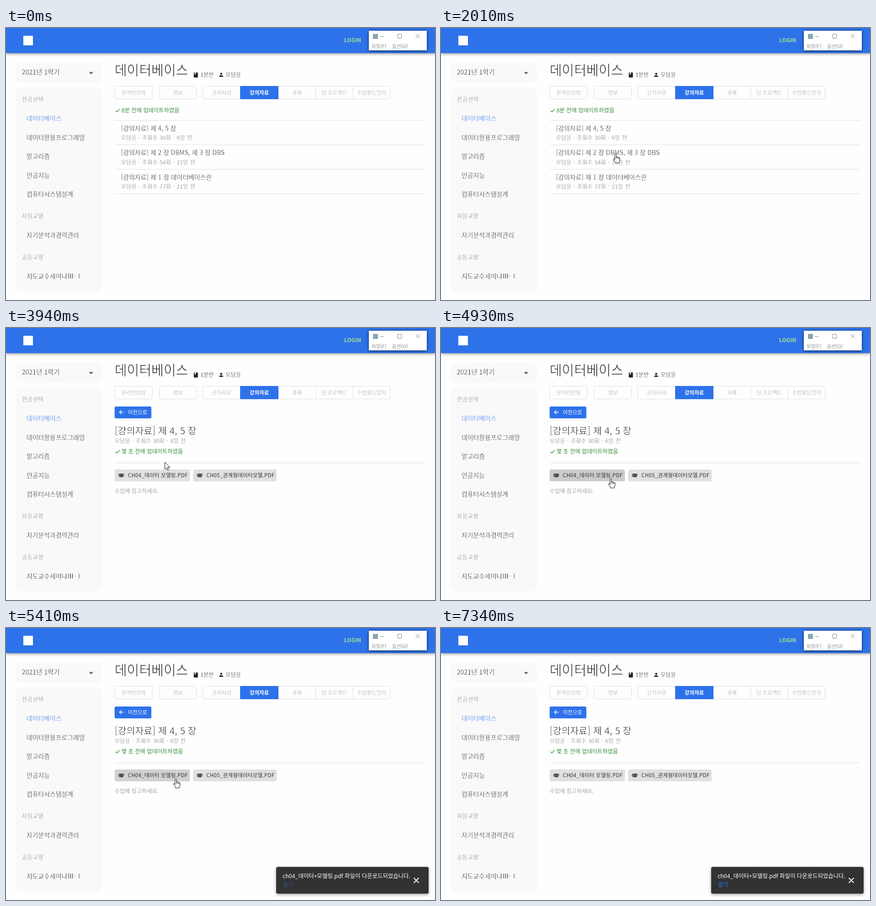
These frames come from a looping animation (940 px wide and 596 px high, 8000 ms). An HTML page:

```html
<!DOCTYPE html>
<html lang="ko">
<head>
<meta charset="utf-8">
<title>강의자료</title>
<style>
html, body { margin: 0; width: 100%; height: 100%; overflow: hidden; background: #fefefe; }
svg { display: block; width: 940px; height: 596px; }
/* the pale outline thins the glyphs where no light weight is installed */
text { font: 300 12.2px "Noto Sans CJK KR", "Noto Sans CJK", sans-serif; fill: #2a2a2a; stroke: #fdfdfd; stroke-width: .025em; white-space: pre; }
.item { font-size: 13.9px; }
.section { font-size: 12px; letter-spacing: .9px; fill: #777; }
.title { font-size: 13.9px; }
.meta { fill: #777; word-spacing: 1.2px; }
.tab { font-size: 11.5px; fill: #999; text-anchor: middle; }
.chip { font-size: 11.5px; letter-spacing: .3px; fill: #333; }
.menu { font-size: 10.6px; fill: #555; }
.toast { font-size: 12.4px; font-weight: 500; fill: #fff; }
.on { fill: #fff; font-weight: 700; }
.blue { fill: #2e72ea; }
.green { font-size: 12.3px; fill: #388e3c; font-weight: 400; }
.chip, .toast, .on, .green, .solid { stroke: none; }
.line { fill: none; stroke: #dedede; }
.shade { filter: drop-shadow(0 2px 3px #0006); }
.float { filter: drop-shadow(0 1px 3px #000a); }
</style>
</head>
<body>
<svg viewBox="0 0 940 596">
  <defs>
    <path id="check" d="M240 0l3 3 6-6.5" fill="none" stroke="#388e3c" stroke-width="1.3"/>
    <path id="close" d="M-5.5-5.5l11 11m0-11l-11 11" stroke="#fff" stroke-width="1.9"/>
    <path id="clip" d="M11 3H4a3 3 0 0 1 0-6h6a2 2 0 0 1 0 4H4.5a1 1 0 0 1 0-2H10" fill="none" stroke="#222" stroke-width="1.3"/>
  </defs>

  <!-- header -->
  <rect class="shade" width="940" height="55" fill="#2e72ea"/>
  <rect x="38" y="17" width="21" height="21" fill="#fff"/>
  <text class="solid" x="741" y="31" style="font-size:12px;font-weight:700;fill:#a0e38c">LOGIN</text>
  <rect class="float" x="795" y="6" width="127" height="43" fill="#fff"/>
  <rect x="804" y="13" width="11" height="11" fill="#8aa5b5"/>
  <path d="M819 18.500h9M858.500 13.500h8v9h-8zM897.500 13.500l9 9m0-9l-9 9" fill="none" stroke="#888"/>
  <text class="menu" x="801" y="44">파일(F)</text>
  <text class="menu" x="846" y="44">옵션(O)</text>

  <!-- sidebar -->
  <rect x="21" y="76" width="190" height="44" rx="14" fill="#f9f9f9"/>
  <rect x="21" y="130" width="190" height="447" rx="14" fill="#f9f9f9"/>
  <text x="34.5" y="102" style="font-size:14.3px">2021년 1학기</text>
  <path d="M181.500 96.500h10l-5 5z" fill="#666"/>
  <text class="section" x="35" y="161">전공선택</text>
  <text class="item blue" x="45" y="203">데이터베이스</text>
  <text class="item" x="45" y="244.500">데이터활용프로그래밍</text>
  <text class="item" x="45" y="286">알고리즘</text>
  <text class="item" x="45" y="328">인공지능</text>
  <text class="item" x="45" y="369">컴퓨터시스템설계</text>
  <text class="section" x="35" y="416.500">자율교양</text>
  <text class="item" x="45" y="459">자기분석과경력관리</text>
  <text class="section" x="35" y="506.500">공통교양</text>
  <text class="item" x="45" y="549">지도교수세미나Ⅲ-Ⅰ</text>

  <!-- course heading -->
  <text x="238" y="103" style="font-size:29.2px">데이터베이스</text>
  <rect x="411.500" y="97.500" width="9" height="11" rx="1" fill="#222"/>
  <path d="M413.500 98v4l1.300-1 1.300 1v-4z" fill="#fff"/>
  <text x="426" y="106.500">1분반</text>
  <circle cx="471.500" cy="100.500" r="2.300" fill="#222"/>
  <path d="M467 107v-1c0-3 9-3 9 0v1z" fill="#222"/>
  <text x="481" y="106.500">오담율</text>

  <!-- tabs -->
  <path class="line" d="M678.500 128v27M760.500 128v27"/>
  <rect class="line" x="238.500" y="127.500" width="82" height="28" rx="3"/>
  <rect class="line" x="335.500" y="127.500" width="82" height="28" rx="3"/>
  <rect class="line" x="431.500" y="127.500" width="410" height="28" rx="3"/>
  <rect x="513" y="127" width="84" height="29" fill="#2e72ea"/>
  <text class="tab" x="279.500" y="145.500">온라인강의</text>
  <text class="tab" x="376.500" y="145.500">정보</text>
  <text class="tab" x="472.500" y="145.500">공지사항</text>
  <text class="tab on" x="555" y="145.500">강의자료</text>
  <text class="tab" x="637" y="145.500">과제</text>
  <text class="tab" x="719" y="145.500">팀 프로젝트</text>
  <text class="tab" x="801" y="145.500">수업활동일지</text>

  <!-- list of posts -->
  <g id="list">
    <use href="#check" y="181"/>
    <text id="updated" class="green" x="253" y="184.500"></text>
    <path class="line" d="M238 202.500h681M238 256h681M238 309.500h681M238 363h681"/>
    <text class="title" x="252" y="224.500">[강의자료] 제 4, 5 장</text>
    <text class="meta" x="252" y="245">오담율 · 조회수 30회 · 6일 전</text>
    <text class="title" x="252" y="278">[강의자료] 제 2 장 DBMS, 제 3 장 DBS</text>
    <text class="meta" x="252" y="298.500">오담율 · 조회수 54회 · 15일 전</text>
    <text class="title" x="252" y="331.500">[강의자료] 제 1 장 데이터베이스란</text>
    <text class="meta" x="252" y="352">오담율 · 조회수 77회 · 21일 전</text>
  </g>

  <!-- opened post -->
  <g id="post">
    <rect x="238" y="172" width="80.500" height="26" rx="3" fill="#2e72ea"/>
    <path d="M258 184.500h-9.500m4.500-4.500l-4.500 4.500 4.500 4.500" fill="none" stroke="#fff" stroke-width="1.300"/>
    <text class="solid" x="267" y="188.500" style="font-size:11.5px;font-weight:500;fill:#fff">이전으로</text>
    <text x="238" y="232.500" style="font-size:20.6px">[강의자료] 제 4, 5 장</text>
    <text class="meta" x="238" y="252">오담율 · 조회수 30회 · 6일 전</text>
    <use href="#check" y="271"/>
    <text class="green" x="253" y="274.500">몇 초 전에 업데이트하였음</text>
    <path class="line" d="M238 295.500h681"/>
    <rect id="chip" x="238" y="310" width="165" height="26" rx="3.500"/>
    <rect x="410" y="310" width="183" height="26" rx="3.500" fill="#e0e0e0"/>
    <use href="#clip" x="246" y="323"/>
    <use href="#clip" x="418" y="323"/>
    <text class="chip" x="267" y="327">CH04_데이터 모델링.PDF</text>
    <text class="chip" x="439" y="327">CH05_관계형데이터모델.PDF</text>
    <text x="238" y="362" style="fill:#777">수업에 참고하세요.</text>
  </g>

  <!-- notifications -->
  <g id="loading">
    <rect class="shade" x="591.500" y="490.500" width="334.500" height="91.500" rx="3.500" fill="#323232"/>
    <text class="toast" x="605" y="520">ch04_데이터+모델링.pdf 파일을 다운로드 중입니다 ...</text>
    <use href="#close" x="899" y="516"/>
    <text class="toast" x="912" y="554.500" text-anchor="end">0Byte / 964.11KB</text>
    <rect x="605" y="567" width="307" height="3.500" fill="#b9c6ee"/>
  </g>
  <g id="done">
    <rect class="shade" x="592" y="523.500" width="334" height="58.500" rx="3.500" fill="#323232"/>
    <text class="toast" x="606" y="548">ch04_데이터+모델링.pdf 파일이 다운로드되었습니다.</text>
    <text id="open" class="blue solid" x="606.500" y="566.500">열기</text>
    <use href="#close" x="899" y="553"/>
  </g>

  <g id="cursor" fill="#fff" stroke="#111" stroke-linejoin="round">
    <path id="arrow" d="M0 0V15.600L3.600 12.200 6 17.800 8.400 16.800 6 11.300H11z"/>
    <path id="hand" d="M-1.600 13.500V1.800a1.600 1.600 0 0 1 3.200 0V8a1.400 1.400 0 0 1 2.800 .400a1.400 1.400 0 0 1 2.600 .600a1.400 1.400 0 0 1 2.400 1V14q0 2.500-1.500 4.500v2H-.500V19L-4.800 12.600q-.400-1.800 1.200-1.900q1 0 2 1.600zM1.600 8v3M4.400 8.400v3M7 9v3"/>
  </g>
</svg>
<script>
const LOOP = 8000;
const $ = id => document.getElementById(id);
const show = (id, on) => $(id).style.display = on ? '' : 'none';
const within = (t, a, b) => t >= a && t < b;
const clamp = v => Math.max(0, Math.min(1, v));

// pointer path: time, x, y
const path = [
  [70, 873, 540], [230, 560, 365], [390, 340, 215], [540, 283, 181],
  [1250, 283, 181], [1540, 283, 204], [1800, 325, 258], [2000, 380, 276],
  [2310, 448, 250], [2560, 476, 222], [2870, 476, 222], [2960, 484, 227],
  [3300, 410, 251], [3630, 338, 218], [3940, 348, 294], [4170, 372, 330],
  [5720, 372, 330], [6100, 500, 435], [6500, 621, 548], [6620, 622, 560],
  [6730, 617, 552], [7100, 616, 551], [7340, -15, 301]
];

function pointAt(t) {
  const i = Math.max(1, path.findIndex(p => p[0] > t));
  const [t0, x0, y0] = path[i - 1], [t1, x1, y1] = path[i];
  const k = clamp((t - t0) / (t1 - t0));
  return [x0 + (x1 - x0) * k, y0 + (y1 - y0) * k];
}

function draw(t) {
  const opened = t >= 2410;
  show('list', !opened);
  show('post', opened);

  const hover = within(t, 460, 1470);
  $('updated').textContent = hover ? '2021년 3월 23일 오후 1시 53분에 업데이트하였음' : '8분 전에 업데이트하였음';
  $('updated').style.fill = hover ? '#4caf50' : '';

  const over = clamp((t - 4050) / 150) * clamp((5900 - t) / 150);
  const press = clamp((t - 4780) / 250) * clamp((5400 - t) / 150);
  const grey = 224 - 15 * over - 10 * press;
  $('chip').style.fill = `rgb(${grey},${grey},${grey})`;

  show('loading', within(t, 5000, 5410));
  $('loading').style.opacity = clamp((t - 5000) / 205);
  show('done', t >= 5410);
  $('open').style.opacity = t < 5490 ? .55 : 1;

  const visible = within(t, 70, 7340);
  show('cursor', visible);
  if (!visible) return;
  const hand = within(t, 460, 2410) || within(t, 4050, 5800) || within(t, 6540, 7110);
  show('hand', hand);
  show('arrow', !hand);
  $('cursor').setAttribute('transform', `translate(${pointAt(t)})`);
}

function tick() {
  draw(performance.now() % LOOP);
  requestAnimationFrame(tick);
}
tick();
</script>
</body>
</html>
```
